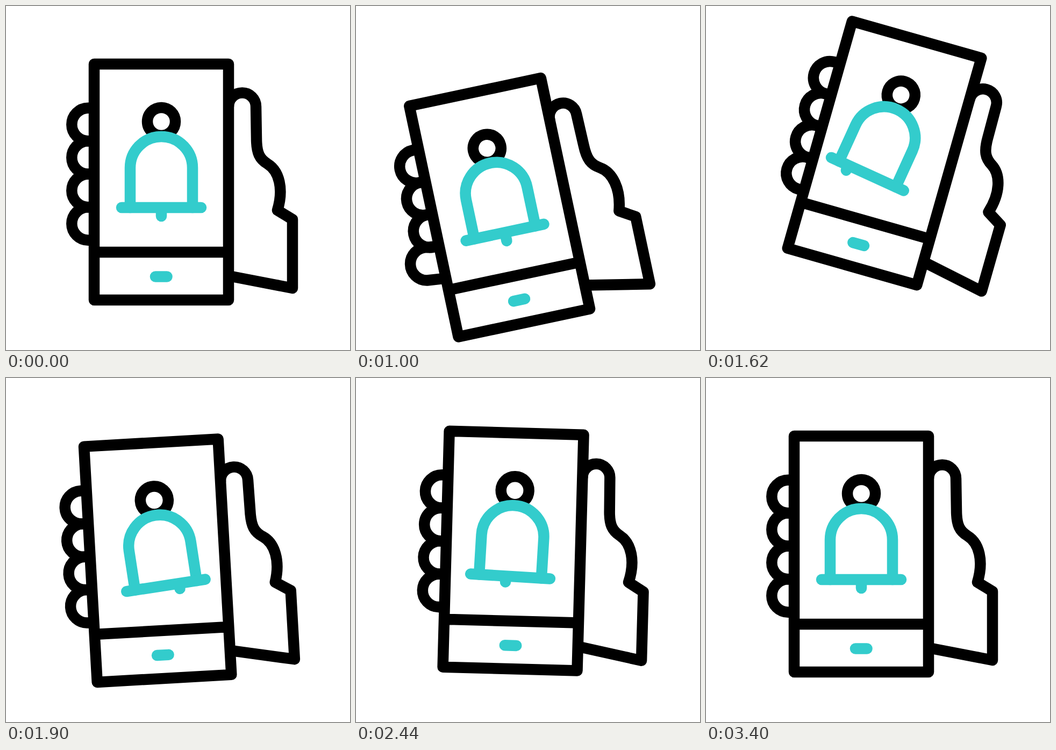
An HTML page for the animation above (3620 ms loop, 640x640 px).

```html
<!DOCTYPE html>
<html>
<head>
<meta charset="utf-8">
<style>
  html, body { margin: 0; height: 100%; overflow: hidden; background: #fff; }
  svg { display: block; width: 100vw; height: 100vh; fill: none; stroke: #000; stroke-width: 20.5;
        stroke-linecap: round; stroke-linejoin: round; }
  .teal { stroke: #3cc; }
</style>
</head>
<body>
<svg viewBox="0 0 640 640">
  <g id="hand">
    <path d="M414 187A25.5 25.5 0 0 1 465 187L466 246C466 274 472 285 487 294C508 307 517 340 505 380L533 397V525L414 502"/>
    <g id="fingers"></g>
    <path fill="#fff" d="M164 108H414V547H164ZM164 458H414"/>
    <path class="teal" d="M278 503.5H299.5"/>
    <circle cx="289" cy="215" r="26"/>
    <g id="bell" class="teal">
      <path id="clapper" d="M289 375V391"/>
      <path fill="#fff" d="M231 375V301A58 58 0 0 1 347 301V375"/>
      <path d="M215 375H363"/>
    </g>
  </g>
</svg>
<script>
const $ = id => document.getElementById(id);
const STEP = 20, LOOP = 3620, LAST = 160;
const R = 30.7; // finger radius

// Keys are [step, value]; eased between neighbours
const phoneKeys = [[40, -12], [51, .5], [54, 0], [72, 16], [89.7, -7], [104, 3], [121, -.15], [134, 0]];
const bellKeys = [[54, 0], [72, 8.7], [89.7, -8.3], [106, 2.6], [136, -5.2], [160, 0]];

const ease = x => (1 - Math.cos(Math.PI * x)) / 2;

function track(keys, n) {
  if (n <= keys[0][0]) return keys[0][1];
  for (let i = 1; i < keys.length; i++) {
    const [a, from] = keys[i - 1], [b, to] = keys[i];
    if (n <= b) return from + (to - from) * ease((n - a) / (b - a));
  }
  return keys[keys.length - 1][1];
}

const fingers = [0, 1, 2, 3].map(() =>
  $('fingers').appendChild(document.createElementNS('http://www.w3.org/2000/svg', 'path')));

// The fingers lift one after another
function drawFinger(path, i, n) {
  const x = (n - 11.8 * i) / 10.5;
  const lift = x > 0 && x < 1 ? 19 * ease(2 * x) : 0;
  const turn = lift * .6 * Math.PI / 180;
  const y = 220.5 + 61.5 * i, cx = 153 - lift, cy = y - lift * .16;
  const dx = R * Math.sin(turn), dy = R * Math.cos(turn);
  path.setAttribute('d', `M164 ${y - R}L${cx + dx} ${cy - dy}A${R} ${R} 0 0 0 ${cx - dx} ${cy + dy}L164 ${y + R}`);
}

function draw(now) {
  const n = Math.min(LAST, Math.max(0, Math.floor(now % LOOP / STEP) - 10));
  const tilt = n < 40 ? -12.05 * (1 - Math.exp(-n / 8)) : track(phoneKeys, n);
  const swing = track(bellKeys, n);
  const shift = -4.5 * swing;
  $('hand').setAttribute('transform', `rotate(${tilt} 503 455)`);
  $('bell').setAttribute('transform', `rotate(${swing} 289 243)`);
  $('clapper').setAttribute('transform', `translate(${shift} ${-Math.min(6, Math.abs(shift) * .6)})`);
  fingers.forEach((path, i) => drawFinger(path, i, n));
}

const start = performance.now();
function frame() {
  draw(performance.now() - start);
  requestAnimationFrame(frame);
}
frame();
</script>
</body>
</html>
```
